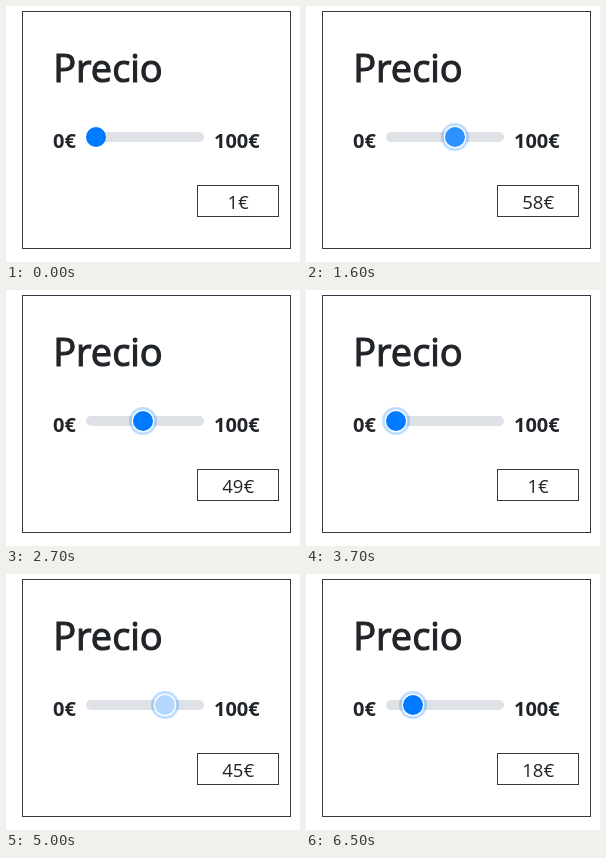
Write an HTML page that moves like this. It is 294 by 256 pixels and loops after 7.5 s.

```html
<!DOCTYPE html>
<html lang="es">
<head>
<meta charset="utf-8">
<title>Precio</title>
<style>
  html, body { margin: 0; width: 100%; height: 100%; overflow: hidden; background: #fff; }
  svg { display: block; }
  text { font-family: "Open Sans", "Noto Sans", sans-serif; fill: #212529; }
  .title { font-size: 38px; stroke: #212529; stroke-width: 1.1px; }
  .limit { font-size: 20px; font-weight: 700; }
  .price { font-size: 18.5px; text-anchor: middle; }
  .frame { fill: none; stroke: #343a40; }
</style>
</head>
<body>
<svg width="294" height="256" viewBox="0 0 294 256">
  <rect class="frame" x="16.5" y="5.5" width="268" height="237"/>
  <text class="title" x="47.2" y="76">Precio</text>
  <text class="limit" x="47" y="142">0€</text>
  <text class="limit" x="208" y="142">100€</text>
  <rect x="80" y="126" width="118" height="10" rx="5" fill="#dee2e6"/>
  <g id="thumb">
    <g id="ring">
      <circle r="14" fill="#007bff" fill-opacity=".25"/>
      <circle r="11.25" fill="#fff"/>
    </g>
    <circle id="knob" r="10"/>
  </g>
  <rect class="frame" x="191.5" y="179.5" width="81" height="31"/>
  <text class="price" id="price" x="232.3" y="203"></text>
</svg>
<script>
const LOOP = 7500, STEP = 100, DRAG_START = 500;
const BLUE = [0, 123, 255], PALE = [179, 215, 255];
const [thumb, ring, knob, price] =
  ["thumb", "ring", "knob", "price"].map(id => document.getElementById(id));

// Time and slider value at each turn of the drag, and at each later click
const drag = [[DRAG_START, 7.5], [1200, 31], [1600, 61], [2100, 82], [2700, 49], [3100, 28]];
const clicks = [[3300, 1], [4200, 45], [4900, 71], [5600, 48], [6200, 18]];

const mix = (a, b, p) => a + (b - a) * p;

// While the value rises, the label trails behind and the knob is slightly pale
function dragState(t) {
  const end = drag.findIndex(([time]) => time > t);
  if (end < 0) return { value: 28, shown: 28, paleness: 0 };
  const [t0, v0] = drag[end - 1], [t1, v1] = drag[end];
  const value = mix(v0, v1, (t - t0) / (t1 - t0));
  const rising = v1 > v0;
  return { value, shown: rising ? value - 3 : value, paleness: rising ? .25 : 0 };
}

// The thumb jumps at once, the label follows on release, the knob flashes pale
function clickState(t) {
  const index = clicks.findLastIndex(([time]) => time <= t);
  const [start, value] = clicks[index];
  const [, before] = clicks[index - 1] ?? drag.at(-1);
  const k = (t - start) / STEP;
  return { value, shown: k < 2 ? before : value, paleness: Math.max(0, 1 - Math.abs(k - 1) / 2) };
}

function stateAt(t) {
  if (t < DRAG_START) return { value: 1, shown: 1, paleness: 0 };
  return t < clicks[0][0] ? dragState(t) : clickState(t);
}

function draw(now) {
  const t = Math.floor((now % LOOP) / STEP) * STEP;
  const { value, shown, paleness } = stateAt(t);
  const x = 90 + Math.round((value - 1) * .98);
  thumb.setAttribute("transform", `translate(${x} 131)`);
  ring.setAttribute("visibility", t < DRAG_START ? "hidden" : "visible");
  knob.setAttribute("fill", `rgb(${BLUE.map((c, i) => Math.round(mix(c, PALE[i], paleness)))})`);
  price.textContent = Math.floor(shown) + "€";
}

const origin = performance.now();
function tick() {
  draw(performance.now() - origin);
  requestAnimationFrame(tick);
}
tick();
</script>
</body>
</html>
```
